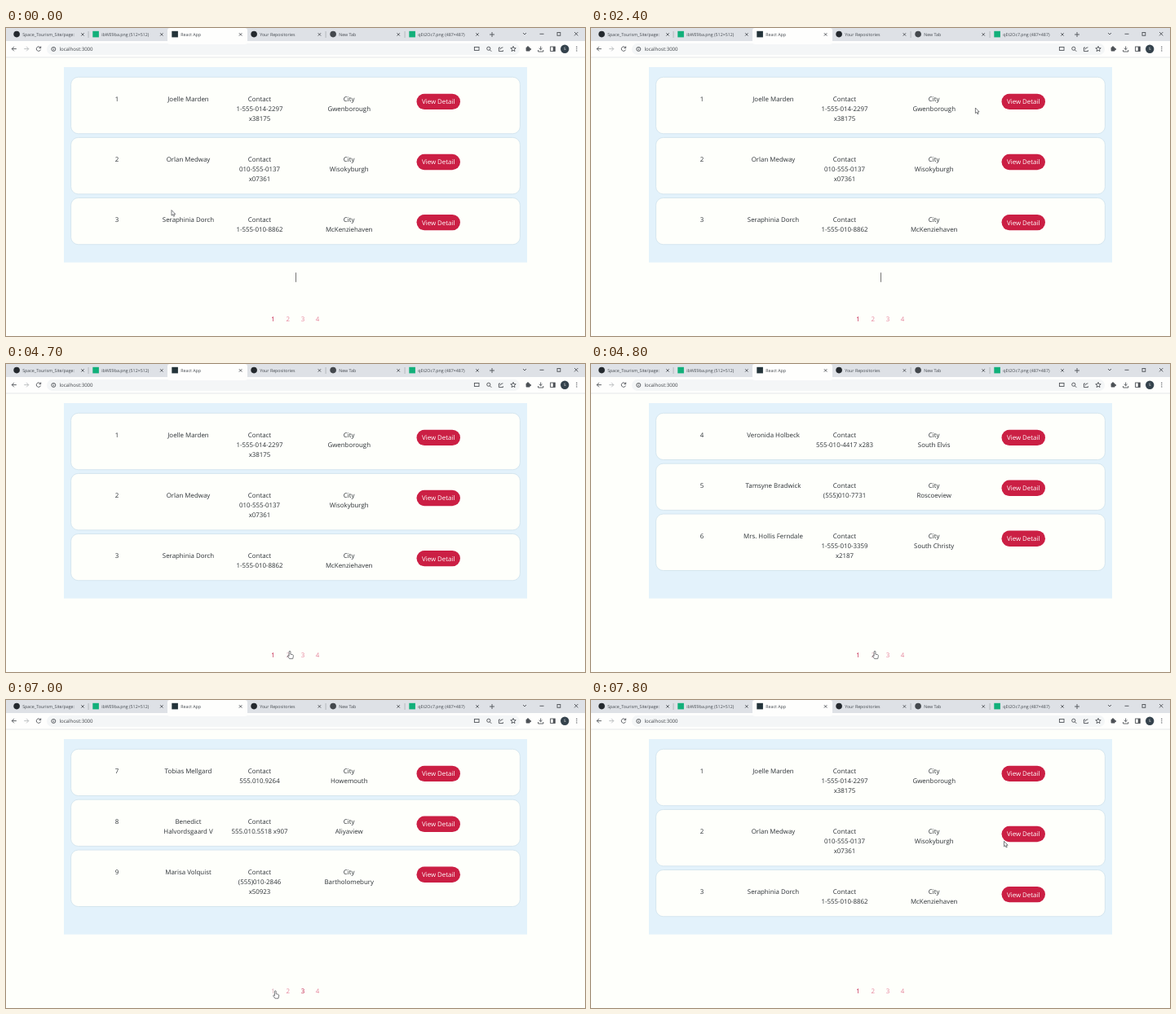
An HTML page for the animation above (8000 ms loop, 710 by 378 pixels).

```html
<!DOCTYPE html>
<html lang="en">
<head>
<meta charset="utf-8">
<title>React App</title>
<style>
html, body { margin: 0; width: 100%; height: 100%; overflow: hidden; background: #fefffb; }
svg { display: block; width: 710px; height: 378px; font-family: "Open Sans", "Noto Sans", sans-serif; text-rendering: geometricPrecision; }
.row { font-size: 7.9px; fill: #2b3035; text-anchor: middle; }
.btn { font-size: 7.9px; fill: #fff; text-anchor: middle; }
.tab { font-size: 5.3px; fill: #454a50; }
.url { font-size: 6.1px; fill: #3f4348; }
.user { font-size: 4.6px; fill: #fff; text-anchor: middle; }
.icon { fill: none; stroke: #4d5156; stroke-width: .9; }
.faint { stroke: #b7babd; }
.num { font-size: 7.9px; text-anchor: middle; }
.pointer { fill: #fff; stroke: #44474b; stroke-width: .7; stroke-linejoin: round; }
</style>
</head>
<body>
<svg id="stage" viewBox="0 0 710 378"></svg>
<script>
const LOOP = 8000, STEP = 100, LINE = 12.2;
const LINK_X = 327.5, LINK_GAP = 18.2;
const stage = document.getElementById('stage');

function add(parent, tag, attrs, text) {
  const el = document.createElementNS('http://www.w3.org/2000/svg', tag);
  for (const key in attrs) el.setAttribute(key, attrs[key]);
  if (text !== undefined) el.textContent = text;
  parent.appendChild(el);
  return el;
}
const rect = (p, x, y, width, height, fill, more) => add(p, 'rect', { x, y, width, height, fill, ...more });
const circle = (cx, cy, r, more) => add(stage, 'circle', { cx, cy, r, ...more });
const label = (p, x, y, cls, text) => add(p, 'text', { x, y, class: cls }, text);
const icon = (x, y, d, cls = '') => add(stage, 'path', { d: `M${x} ${y}${d}`, class: 'icon ' + cls });
const cross = (x, y, r) => icon(x - r, y - r, `l${2 * r} ${2 * r}m0 ${-2 * r}l${-2 * r} ${2 * r}`);
const navArrow = (x, dir, cls) => icon(x - dir * 2.8, 25.6, `h${dir * 5.6}m${-dir * 2.7} -2.7l${dir * 2.7} 2.7l${-dir * 2.7} 2.7`, cls);
const box = (x, y, w, h) => rect(stage, x, y, w, h, 'none', { class: 'icon' });

function drawTabs() {
  rect(stage, 0, 0, 710, 16, '#dee1e6');
  rect(stage, 198, 0, 98, 20, '#fefefd', { rx: 3 });
  const tabs = [
    ['Space_Tourism_Site/page:', '#24292e', 4],
    ['ibWE9ba.png (512×512)', '#12b07a', 0],
    ['React App', '#24343a', 0],
    ['Your Repositories', '#24292e', 4],
    ['New Tab', '#44484d', 4],
    ['qEt2Oc7.png (487×487)', '#12b07a', 0]
  ];
  tabs.forEach(([title, color, rx], i) => {
    const x = 9.3 + i * 97;
    rect(stage, x, 3.8, 7.6, 7.6, color, { rx });
    label(stage, x + 10.9, 9.7, 'tab', title);
    cross(94 + i * 96.8, 7.9, 1.7);
    if (i % 4 === 0 || i === 3) rect(stage, x + 91.4, 4, .7, 8, i < 5 ? '#a4a8ad' : 'none');
  });
  icon(593, 8, 'h6m-3 -3v6');
  icon(634, 6, 'l2 2l2 -2');
  icon(654.5, 7.3, 'h5');
  box(676, 5.5, 3.8, 3.8);
  cross(699.2, 7.2, 2.2);
}

function drawToolbar() {
  rect(stage, 0, 16, 710, 20, '#fefefd');
  rect(stage, 0, 35.6, 710, .8, '#dfe1e4');
  rect(stage, 50, 18.8, 580, 14.2, '#f4f6f7', { rx: 7.1 });
  navArrow(10, -1);
  navArrow(25, 1, 'faint');
  icon(42.3, 24.2, 'a2.7 2.7 0 1 0 .2 2.4m.2 -4.1v2.2h-2.2');
  circle(58.3, 25.9, 2.5, { class: 'icon' });
  icon(58.3, 24.4, 'v.7m0 .5v1.7');
  label(stage, 65.5, 28, 'url', 'localhost:3000');

  box(574.4, 23.4, 5.6, 4);
  circle(591.8, 25.2, 2.1, { class: 'icon' });
  icon(593.3, 26.8, 'l2 2');
  icon(606, 24, 'h-1.6v4.6h5v-1.4m-3.4 -.8q.4 -2.6 3.4 -2.6');
  const star = Array.from({ length: 10 }, (_, i) => {
    const r = i % 2 ? 1.5 : 3.4, a = i * Math.PI / 5;
    return [622 + r * Math.sin(a), 25.8 - r * Math.cos(a)];
  });
  add(stage, 'polygon', { points: star.join(' '), class: 'icon' });
  rect(stage, 637.6, 23.6, 5, 5, '#4d5156', { rx: .8 });
  circle(640, 23.4, 1.1, { fill: '#4d5156' });
  circle(643, 26, 1.1, { fill: '#4d5156' });
  icon(655.7, 22.5, 'v4m-1.8 -1.7l1.8 1.8l1.8 -1.8m-4.9 2.2v2h6.2v-2');
  box(667.6, 23, 5.6, 5.4);
  rect(stage, 670.8, 23, 2.5, 5.4, '#4d5156');
  circle(685.2, 25.7, 5.2, { fill: '#34424c' });
  label(stage, 685.2, 27.4, 'user', 'S');
  for (let i = -1; i <= 1; i++) circle(699.8, 25.6 + i * 2.3, .7, { fill: '#4d5156' });
}

// name, phone and city; "|" breaks the line
const people = [
  ['Joelle Marden', '1-555-014-2297|x38175', 'Gwenborough'],
  ['Orlan Medway', '010-555-0137|x07361', 'Wisokyburgh'],
  ['Seraphinia Dorch', '1-555-010-8862', 'McKenziehaven'],
  ['Veronida Holbeck', '555-010-4417 x283', 'South Elvis'],
  ['Tamsyne Bradwick', '(555)010-7731', 'Roscoeview'],
  ['Mrs. Hollis Ferndale', '1-555-010-3359|x2187', 'South Christy'],
  ['Tobias Mellgard', '555.010.9264', 'Howemouth'],
  ['Benedict|Halvordsgaard V', '555.010.5518 x907', 'Aliyaview'],
  ['Marisa Volquist', '(555)010-2846|x50923', 'Bartholomebury']
];

function column(p, x, y, lines) {
  lines.forEach((line, i) => label(p, x, y + i * LINE, 'row', line));
}

function drawPage(index) {
  const group = add(stage, 'g', {});
  let top = 60.3;
  for (let id = index * 3 + 1; id <= index * 3 + 3; id++) {
    const [name, phone, city] = people[id - 1];
    const contact = ['Contact', ...phone.split('|')];
    const height = 32.8 + contact.length * LINE;
    const base = top + 29.6;
    rect(group, 79.6, top, 550.8, height, '#fefffb', { rx: 9, stroke: '#cbdfea', 'stroke-width': .7 });
    column(group, 136, base, [id]);
    column(group, 223.5, base, name.split('|'));
    column(group, 311, base, contact);
    column(group, 420.7, base, ['City', city]);
    rect(group, 503.5, top + 20.4, 53.5, 19.4, '#cb1f44', { rx: 9.7 });
    label(group, 530.2, top + 33, 'btn', 'View Detail');
    top += height + 4.7;
  }
  return group;
}

drawToolbar();
drawTabs();
rect(stage, 71, 48, 568, 239.7, '#e3f2fb');
const pages = [0, 1, 2].map(drawPage);
const caret = rect(stage, 355, 300.2, .9, 11.6, '#666');
const links = [0, 1, 2, 3].map(i => label(stage, LINK_X + i * LINK_GAP, 360.4, 'num', i + 1));
const arrow = add(stage, 'path', { class: 'pointer', d: 'M0 0V6.6L1.5 5.3L2.6 7.7L3.7 7.2L2.7 4.9H4.7Z' });
const hand = add(stage, 'path', {
  class: 'pointer',
  d: 'M-.9 .7a.9 .9 0 0 1 1.8 0V3.7L3.6 4.3Q4.6 4.7 4.4 6L3.7 9.2H-.4L-2.4 6.4Q-2.8 5.2 -1.8 5.2L-.9 6Z'
});

// pointer moves: start, end, x, y reached
const home = [203, 223.5];
const moves = [
  [400, 500, 211, 235], [700, 1100, 353, 300], [1300, 1600, 381, 189],
  [1700, 2100, 562, 92], [2100, 2400, 471.4, 98], [2700, 3200, 441, 166],
  [3300, 3400, 329, 250], [3800, 4000, 348, 352.5], [5100, 5300, 360, 358],
  [5700, 5800, 366, 357.8], [6300, 6600, 330.3, 357], [7200, 7800, 506.5, 173.3]
];
const clicks = [4700, 6000, 7100];

function pointer(t) {
  return moves.reduce(([px, py], [from, to, x, y]) => {
    const k = Math.min(1, Math.max(0, (t - from) / (to - from)));
    return [px + (x - px) * k, py + (y - py) * k];
  }, home);
}

const clicked = t => clicks.filter(at => at <= t).length % pages.length;
const show = (el, on) => el.setAttribute('visibility', on ? 'visible' : 'hidden');

function render(time) {
  const t = Math.floor((time % LOOP) / STEP) * STEP;
  const [x, y] = pointer(t);
  const overLink = y > 345;
  const hover = overLink ? Math.round((x - LINK_X) / LINK_GAP) : -1;

  // the rows change one step after a click, the highlight two
  const page = clicked(t - STEP), active = clicked(t - 2 * STEP);
  pages.forEach((p, i) => show(p, i === page));
  links.forEach((n, i) => n.setAttribute('fill',
    i === active ? '#c01a44' : i === hover ? '#d5a5b2' : '#e5829a'));

  // the caret blinks until the first click
  const lit = t < 900 || Math.floor((t + 100) / 500) % 2 === 1;
  show(caret, lit && t < clicks[0]);

  show(arrow, !overLink);
  show(hand, overLink);
  (overLink ? hand : arrow).setAttribute('transform', `translate(${x} ${y})`);
}

const start = performance.now();
function tick() {
  render(performance.now() - start);
  requestAnimationFrame(tick);
}
tick();
</script>
</body>
</html>
```
